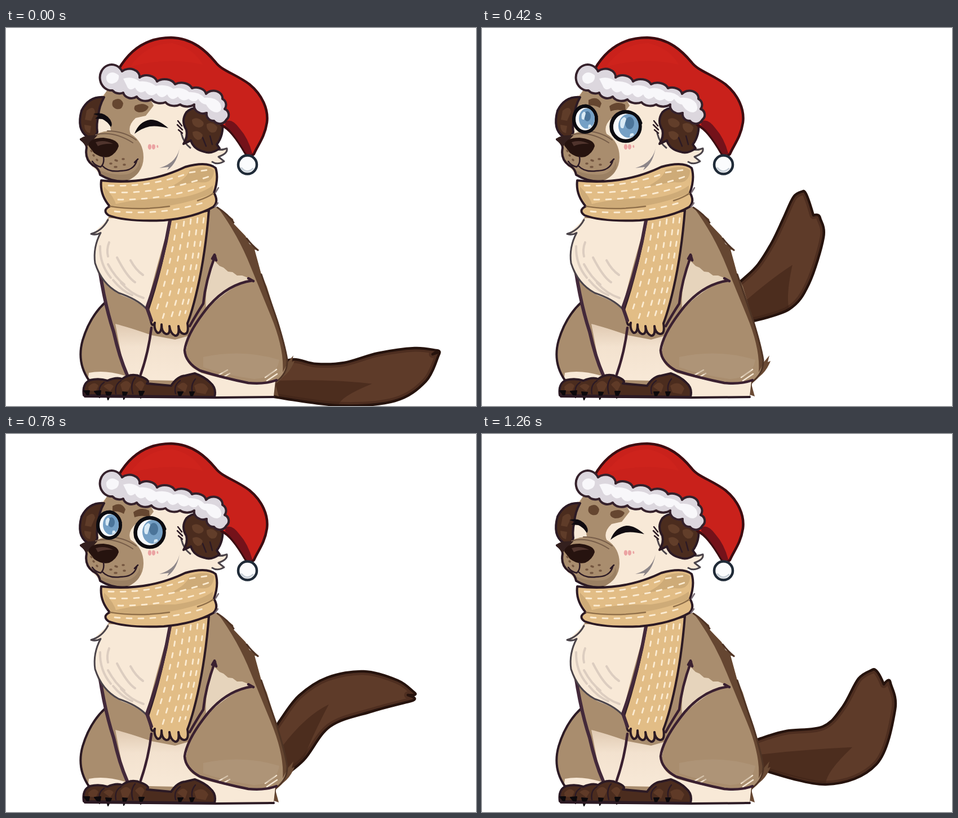
These frames come from a looping animation (834x672 px, 1320 ms). An HTML page:

```html
<!DOCTYPE html>
<html lang="en">
<head>
<meta charset="utf-8">
<title>Festive dog</title>
<style>
html, body { margin: 0; width: 100%; height: 100%; overflow: hidden; background: #fff; }
svg { display: block; width: 834px; height: 672px; }
path, ellipse, circle { stroke-linecap: round; stroke-linejoin: round; }
.ink { fill: none; stroke: #2c1a24; stroke-width: 4; }
.thin { fill: none; stroke: #2c1a24; stroke-width: 2.5; }
.plum { fill: none; stroke: #3a2030; stroke-width: 4.5; }
.bold { fill: none; stroke: #43293a; stroke-width: 6; }
.rust { fill: none; stroke: #4f3425; stroke-width: 3; }
.grey { fill: none; stroke: #4b444a; stroke-width: 3; }
.edge { stroke: #2c1a24; stroke-width: 4; }
.tan { fill: #a98d6e; }
.cream { fill: #f8e9d7; }
.dark { fill: #4b2c1e; }
.scarf { fill: #e2bd86; }
.soft { fill: none; stroke: #dccdc0; stroke-width: 4; }
.knit { fill: none; stroke: #fcecd2; stroke-width: 2.8; }
.rim { fill: #f7fafc; stroke: #0c0b10; }
.iris { fill: #75a0c5; }
.pupil { fill: #4b7499; }
.lash { fill: none; stroke: #0c0b10; stroke-width: 5; }
.blush { fill: #eba3a2; }
.brow { fill: #654630; }
</style>
</head>
<body>
<svg viewBox="0 0 834 672">
  <defs>
    <linearGradient id="legTone" x1="0" y1="0" x2="0" y2="1">
      <stop offset="0" stop-color="#dfc9b1"/>
      <stop offset=".4" stop-color="#f3e2cf"/>
      <stop offset="1" stop-color="#f8e9d7"/>
    </linearGradient>
  </defs>

  <g id="tail">
    <clipPath id="inside"><path class="shape"/></clipPath>
    <path class="shape" fill="#5e3b29"/>
    <g clip-path="url(#inside)">
      <path id="shade" fill="#432619" opacity=".65"/>
      <path class="shape" fill="none" stroke="#3a2015" stroke-width="13" opacity=".45"/>
    </g>
    <path class="shape" fill="none" stroke="#26130d" stroke-width="4.5"/>
  </g>

  <g id="body">
    <path fill="#6a4a34" d="M488 592L500 594 510 582 507 594 512 592Q505 610 492 620L478 633 484 655 470 650Z"/>
    <path class="tan" d="M183 335Q160 365 157 400Q158 425 165 440L177 487Q150 512 137 555Q126 595 146 628L140 650 372 656 475 656 478 632Q502 616 499 590Q493 560 481 520L463 460 453 438 441 394 449 395 432 384 425 370 404 348 403 340 375 318Z"/>
    <path fill="#654631" d="M375 318L403 340 404 348 425 370 432 384 449 395 441 394 453 438 479 510Q497 565 500 595L491 612Q494 570 470 512L434 424Q412 368 375 318Z"/>
    <path class="rust" d="M375 319Q395 332 404 346M427 374Q436 386 447 395M453 438L481 520Q495 565 499 590Q500 615 478 630L474 654"/>
    <path class="cream" d="M147 613Q175 607 211 618L207 630 145 630Z"/>
    <path fill="url(#legTone)" d="M194 526Q218 532 258 546L300 554 325 547 318 580Q322 604 345 611L350 628 213 625Z"/>
    <path fill="#e6d4bc" d="M369 413L379 423 386 426 394 433 402 434 410 440 419 440 437 447Q405 454 355 500Q352 460 369 413Z"/>
    <path class="cream" d="M335 610Q390 626 430 631Q460 634 478 628L475 655 370 656Z"/>
    <path fill="none" stroke="#f5e7d4" stroke-width="2.5" d="M377 617l16-9M380 624l17-10M460 621l20-14M463 627l18-12"/>
    <path fill="#b49b80" opacity=".5" d="M350 585Q420 570 485 590Q480 622 440 624Q390 617 350 603Z"/>

    <path class="ink" d="M177 487Q149 512 136 555Q125 594 147 626"/>
    <path class="bold" d="M166 430Q176 495 191 540Q201 585 215 617"/>
    <path class="plum" d="M258 533Q253 576 239 616"/>
    <path class="plum" d="M371 405Q354 450 350 490Q337 510 326 530M366 410l4-7 3 10"/>
    <path class="plum" d="M437 449Q394 455 360 494Q321 542 317 573Q318 594 344 609Q385 622 430 631Q458 634 480 626M430 445l9 5"/>

    <path class="cream" d="M183 338L152 367 166 364Q155 390 158 418Q175 462 205 475Q231 484 249 499Q265 430 292 341Z"/>
    <path class="soft" d="M167 388Q166 420 186 444M181 420Q194 444 210 456M197 408Q215 443 229 452M204 453Q222 473 244 480M190 448Q205 467 224 475M221 413Q230 430 243 439M183 381Q178 394 181 406"/>
    <path class="grey" d="M181 341Q170 361 151 366Q160 369 168 364Q154 390 158 418Q170 455 200 471Q233 482 249 499"/>
  </g>

  <g id="paws">
    <path class="dark edge" d="M138 653Q135 632 149 626Q165 622 180 627Q196 620 206 624Q222 612 240 620Q257 627 250 632L293 636Q304 619 318 618L335 614Q352 620 362 630Q374 640 370 656Z"/>
    <path fill="#5f3a27" d="M146 638Q156 626 164 636L160 645H147ZM173 637Q183 628 191 637L185 646ZM203 634Q214 621 222 634L217 645 207 647ZM229 634Q240 621 246 634L240 646ZM304 638Q314 624 322 636L318 648ZM334 636Q350 625 359 641L354 651 338 648Z"/>
    <path class="thin" d="M166 651Q163 637 174 630M195 650Q192 634 204 627M225 650Q220 633 229 622M301 650Q297 635 309 627M332 652Q326 636 336 624"/>
    <path fill="#0c090c" stroke="#0c090c" stroke-width="2" d="M138 645l8 10 2-10zM157 646l9 11 2-12zM177 647l4 14 6-13zM207 647l2 13 6-12zM236 646l3 12 6-12zM305 647l3 10 6-10zM326 647l3 10 5-10z"/>
    <path class="ink" d="M140 655L250 656 372 657 475 656"/>
  </g>

  <g id="wrap">
    <path class="scarf edge" d="M292 340L360 324Q354 400 340 462Q331 502 322 525Q325 545 316 544Q307 542 306 530Q308 548 300 547Q292 544 290 530Q292 545 284 544Q276 541 276 527Q276 543 269 542Q262 536 264 524Q259 533 257 521L252 501Q276 430 292 340Z"/>
    <path class="bold" d="M291 342Q278 420 250 497L258 520"/>
    <path class="knit" stroke-dasharray="8 13" d="M303 348Q291 430 265 508M316 344Q305 430 278 516M328 340Q318 440 292 518M340 338Q330 440 305 518M351 338Q340 430 318 507"/>
  </g>

  <g id="head">
    <path class="cream" d="M165 125L205 90 325 120 322 180 331 211Q350 222 365 212L394 216Q390 226 376 229L384 237Q373 243 365 239L370 255 300 280 215 275 166 260 145 238 143 212 160 190Z"/>
    <path class="grey" d="M363 212Q377 220 392 214Q394 223 377 229L387 237Q375 244 366 238M311 187Q315 204 327 213"/>
    <path fill="#8c8588" d="M309 207Q306 239 272 249L289 247 286 253Q305 240 309 207Z"/>
    <path class="tan" d="M172 122L183 105 255 125 262 138 248 156 230 160Q215 174 221 188Q244 202 244 230Q244 258 215 272Q187 276 168 261Q165 248 154 244Q139 228 143 210L161 188 184 181Q191 163 166 151Z"/>
    <path class="cream" d="M164 153Q183 158 186 182Q174 185 163 184Z"/>
    <path fill="#8a6f55" opacity=".45" d="M167 253Q190 263 215 260Q234 255 237 237Q245 260 213 272Q188 276 168 261Z"/>
    <path class="dark edge" d="M174 123Q147 121 134 147Q125 180 144 193Q158 198 162 185Q160 171 164 156Q165 139 174 123Z"/>
    <path fill="#5f3c29" d="M143 147Q156 136 158 149L151 165 140 163ZM139 172L151 174 149 187Q139 185 139 172Z"/>
    <path class="dark edge" d="M320 150Q333 137 352 145L384 165Q387 190 374 207L379 214Q364 225 352 220Q333 216 328 200L315 206Q323 193 320 181Q310 165 320 150Z"/>
    <path fill="#623e2a" d="M330 163q9-7 20 4q3 8-8 10q-12-2-12-14zM356 171q10-6 19 5q0 10-10 10q-10-4-9-15zM331 185q10-5 18 5q-1 9-9 9q-9-4-9-14z"/>
    <path class="thin" d="M355 210l-6-15M366 207l-4-15M305 165l7 9M304 172l9 9M306 181l7 6"/>

    <path class="ink" d="M133 198Q143 205 143 213Q139 233 154 244Q165 249 167 261Q190 275 215 272"/>
    <path fill="#34201e" d="M131 197Q142 189 162 191L153 201 143 211Z"/>
    <path fill="none" stroke="#775d49" stroke-width="2" d="M159 190Q190 182 225 204M180 183Q209 183 231 199"/>
    <path fill="#26130f" d="M146 209Q148 195 173 195Q199 198 200 210Q196 223 183 229Q169 232 156 222Z"/>
    <path fill="#50342d" d="M159 203Q174 198 190 206Q174 205 163 210Z"/>
    <path class="thin" d="M173 229Q175 241 168 247Q158 245 153 237M171 245Q182 257 203 254Q227 254 232 236M228 239L234 233"/>
    <path fill="none" stroke="#745640" stroke-width="3.5" d="M155 226l1 1M161 234l1 1M151 218l1 1M185 241l2 0M194 235l3 1M207 233l2 0M193 247l3 0M209 243l2 0"/>
  </g>

  <g id="eyes">
    <g>
      <path class="brow" d="M190 129Q203 121 208 134Q207 146 196 144Q185 140 190 129ZM229 138Q244 131 253 140Q250 150 236 150Q224 147 229 138Z"/>
      <path fill="#100b10" d="M155 153Q173 147 185 163Q190 172 186 176Q180 166 171 162L158 161 165 156ZM228 188Q236 166 256 163Q270 162 288 178Q268 173 255 175Q241 178 228 188Z"/>
    </g>
    <g>
      <path class="brow" d="M189 128Q203 121 210 134Q208 147 198 144Q185 139 189 128ZM226 138Q241 131 254 137Q255 148 242 149L231 154Z"/>
      <path class="rim" stroke-width="4" d="M162 148Q172 142 187 151Q199 164 197 178Q184 184 170 175Q161 163 162 148Z"/>
      <path class="iris" d="M173 150Q189 150 196 172Q188 181 178 174Q169 163 173 150Z"/>
      <path class="pupil" d="M180 155q9 4 9 13q-7 2-10-5z"/>
      <circle cx="178" cy="159" r="3.5" fill="#fff"/>
      <path fill="#0c0b10" d="M158 152Q165 139 185 147Q198 157 200 171Q184 151 164 150Z"/>
      <path class="rim" stroke-width="4" d="M233 180Q237 157 259 152Q282 152 283 169Q281 186 259 188Q241 189 233 180Z"/>
      <ellipse class="iris" cx="262" cy="169" rx="16" ry="15"/>
      <ellipse class="pupil" cx="264" cy="166" rx="7" ry="8"/>
      <circle cx="256" cy="166" r="4.5" fill="#fff"/><circle cx="268" cy="177" r="2.5" fill="#dcecf7"/>
      <path fill="#0c0b10" d="M229 186Q233 157 257 150Q282 148 286 170Q271 154 254 157Q238 164 229 186Z"/>
    </g>
    <g>
      <path class="brow" d="M189 128Q205 119 212 134L209 142Q199 136 189 138ZM226 139Q239 129 254 136L255 148Q241 143 228 148Z"/>
      <ellipse class="rim" stroke-width="6" cx="183" cy="162" rx="20" ry="23"/>
      <ellipse class="iris" cx="186" cy="161" rx="14" ry="18"/>
      <ellipse class="pupil" cx="187" cy="157" rx="6" ry="9"/>
      <path fill="#d9eaf5" d="M177 153q5-8 7-1l-3 11q-6 1-4-10zM189 172q6-2 5 4l-6 2z"/>
      <path class="lash" d="M163 165Q163 139 184 138Q198 141 203 157"/>
      <ellipse class="rim" stroke-width="6.5" cx="255" cy="175" rx="25.5" ry="26"/>
      <ellipse class="iris" cx="260" cy="174" rx="18" ry="21"/>
      <ellipse class="pupil" cx="262" cy="169" rx="8" ry="11"/>
      <path fill="#d9eaf5" d="M246 164q7-10 10-2l-5 16q-8 2-5-14zM263 188q8-3 6 3l-7 3z"/>
      <path class="lash" d="M230 184Q228 153 255 149Q276 150 282 169"/>
    </g>
  </g>
  <path class="blush" d="M253 207q5-2 5 4t-4 5q-4-3-1-9zM260 207q5-1 5 4t-4 5q-4-3-1-9zM268 208q3 0 2 5q-4 0-2-5z"/>

  <g id="collar">
    <path class="scarf edge" d="M169 271Q250 280 318 247Q357 236 372 249Q378 267 369 293Q378 308 368 318Q335 337 280 342Q214 345 182 333Q170 324 184 317Q166 296 169 271Z"/>
    <path fill="#c3a170" opacity=".65" d="M187 315Q230 302 300 303Q344 297 367 280L367 294Q275 331 187 315ZM326 252Q357 242 369 253Q368 278 343 274Q315 276 283 286Q320 271 326 252ZM174 282Q192 300 196 316L187 316Q172 300 174 282Z"/>
    <path fill="none" stroke="#8f6f4a" stroke-width="2.5" d="M185 317Q235 325 290 317M340 307Q356 302 368 294"/>
    <path class="knit" stroke-dasharray="9 12" d="M182 280Q260 283 326 257L360 252M185 292Q270 296 360 264M199 305Q280 306 360 279M193 326Q280 334 358 308"/>
    <path fill="none" stroke="#776a72" stroke-width="2.5" d="M372 292l5-8M371 318l5-7"/>
  </g>

  <g id="hat">
    <path fill="#c9211b" stroke="#3d0d12" stroke-width="4.5" d="M200 73C218 42 246 17 293 17C332 18 356 42 372 61C383 76 408 82 432 100C455 119 466 145 463 168C459 195 446 209 440 224Q432 231 425 223Q401 181 383 173L350 135 210 95Z"/>
    <path fill="#74121a" d="M389 166Q401 160 414 178Q430 196 437 223Q430 229 425 221Q405 187 389 173Z"/>
    <path fill="#d3271f" opacity=".5" d="M220 69Q250 27 295 27Q332 35 349 65Q289 50 220 69Z"/>
    <path fill="#dcd7de" stroke="#35212b" stroke-width="4" d="M206 77A18 14 0 0 1 237 88A19 15 0 0 1 268 95A20 15 0 0 1 300 100A20 15 0 0 1 330 107A18 13 0 0 1 355 117A16 13 0 0 1 384 126A12 12 0 0 1 388 144A11 11 0 0 1 391 163A13 13 0 0 1 369 165A12 12 0 0 1 356 151A16 14 0 0 1 334 136A18 13 0 0 1 309 136A18 13 0 0 1 283 132A18 13 0 0 1 258 127A17 13 0 0 1 232 122A15 13 0 0 1 208 115A15 13 0 0 1 189 111A21 23 0 1 1 206 77Z"/>
    <path fill="#f8f7fa" d="M178 86Q186 73 200 84Q202 96 189 99Q177 99 178 86ZM208 90Q224 85 237 95Q253 93 266 103Q284 99 297 108Q313 104 325 114Q342 113 352 124Q371 122 380 134Q386 147 375 150Q363 150 355 136Q346 135 341 126Q334 135 324 126Q313 133 305 122Q293 132 286 118Q275 129 267 116Q255 125 247 112Q236 119 229 106Q218 114 214 102Z"/>
    <circle cx="428.500" cy="243" r="16.500" fill="#fbfcfd" stroke="#202b38" stroke-width="4.500"/>
    <path fill="none" stroke="#c7cfd7" stroke-width="3" d="M418 249Q427 260 438 250"/>
  </g>
</svg>
<script>
const STEP = 60, LOOP = 1320, CYCLE = 12;
const $ = id => document.getElementById(id);
const points = text => text.split(" ").map(p => p.split(",").map(Number));

// Each pose runs up the top edge, over the split tip and back to the base.
const low = points("470,600 510,589 550,597 600,595 660,578 725,569 764,573 757,580 768,581 745,628 690,663 590,671 470,655");
const lift = points("470,535 487,508 520,465 570,433 635,422 695,438 724,459 713,464 718,475 650,493 575,520 528,580 480,618");
const high = points("400,400 414,350 428,312 443,287 465,270 487,266 509,275 505,291 525,296 519,335 493,400 478,440 460,475");
const fall = points("440,465 465,445 490,420 515,380 535,338 553,300 570,290 588,333 600,338 606,372 580,455 545,500 475,523");
const drop = points("470,552 495,541 540,528 605,520 640,485 668,435 693,419 713,445 725,443 733,490 700,587 610,623 480,592");

function turn(pose, [cx, cy], angle, scale) {
  const c = Math.cos(angle) * scale, s = Math.sin(angle) * scale;
  return pose.map(([x, y]) => [
    cx + (x - cx) * c - (y - cy) * s,
    cy + (x - cx) * s + (y - cy) * c
  ]);
}
const peak = turn(high, [445, 440], -0.384, 1.2);
const keys = [[0, low], [1, lift], [3, high], [5, peak], [7, fall], [9, drop], [CYCLE, low]];

const mix = (a, b, k) => a.map((v, i) => v + (b[i] - v) * k);

function poseAt(step) {
  const i = keys.findIndex(([at]) => at > step);
  const [a, from] = keys[i - 1], [b, to] = keys[i];
  const k = (step - a) / (b - a);
  return from.map((p, j) => mix(p, to[j], k));
}

function spline(pts) {
  let d = "";
  for (let i = 0; i < pts.length - 1; i++) {
    const a = pts[i], b = pts[i + 1];
    const before = pts[i - 1] || a, after = pts[i + 2] || b;
    const c1 = a.map((v, j) => v + (b[j] - before[j]) / 6);
    const c2 = b.map((v, j) => v - (after[j] - a[j]) / 6);
    d += `C${c1} ${c2} ${b}`;
  }
  return d;
}

const shapes = document.querySelectorAll(".shape");

function drawTail(p) {
  const tip = mix(p[5], p[6], 1.3), lobe = mix(p[9], p[8], 1.25);
  const d = `M${p[0]}${spline(p.slice(0, 7))}Q${tip} ${p[7]}Q${lobe} ${p[8]}${spline(p.slice(8))}`;
  shapes.forEach(shape => shape.setAttribute("d", d));
  const inner = mix(p[2], p[11], 0.35), reach = mix(p[3], p[10], 0.55);
  $("shade").setAttribute("d", `M${mix(p[0], p[12], 0.5)}Q${inner} ${reach}Q${mix(p[3], p[11], 0.8)} ${p[11]}L${p[12]}Z`);
}

function eyeState(t) {
  if (t < 120 || t >= 1260) return 0;
  return t < 240 || t >= 1140 ? 1 : 2;
}

const eyes = [...$("eyes").children];
const start = performance.now();
let shown = -1;

function tick() {
  const frame = Math.floor((performance.now() - start) % LOOP / STEP);
  if (frame !== shown) {
    shown = frame;
    drawTail(poseAt(frame % CYCLE));
    const state = eyeState(frame * STEP);
    eyes.forEach((eye, i) => eye.style.display = i === state ? "" : "none");
  }
  requestAnimationFrame(tick);
}
tick();
</script>
</body>
</html>
```
